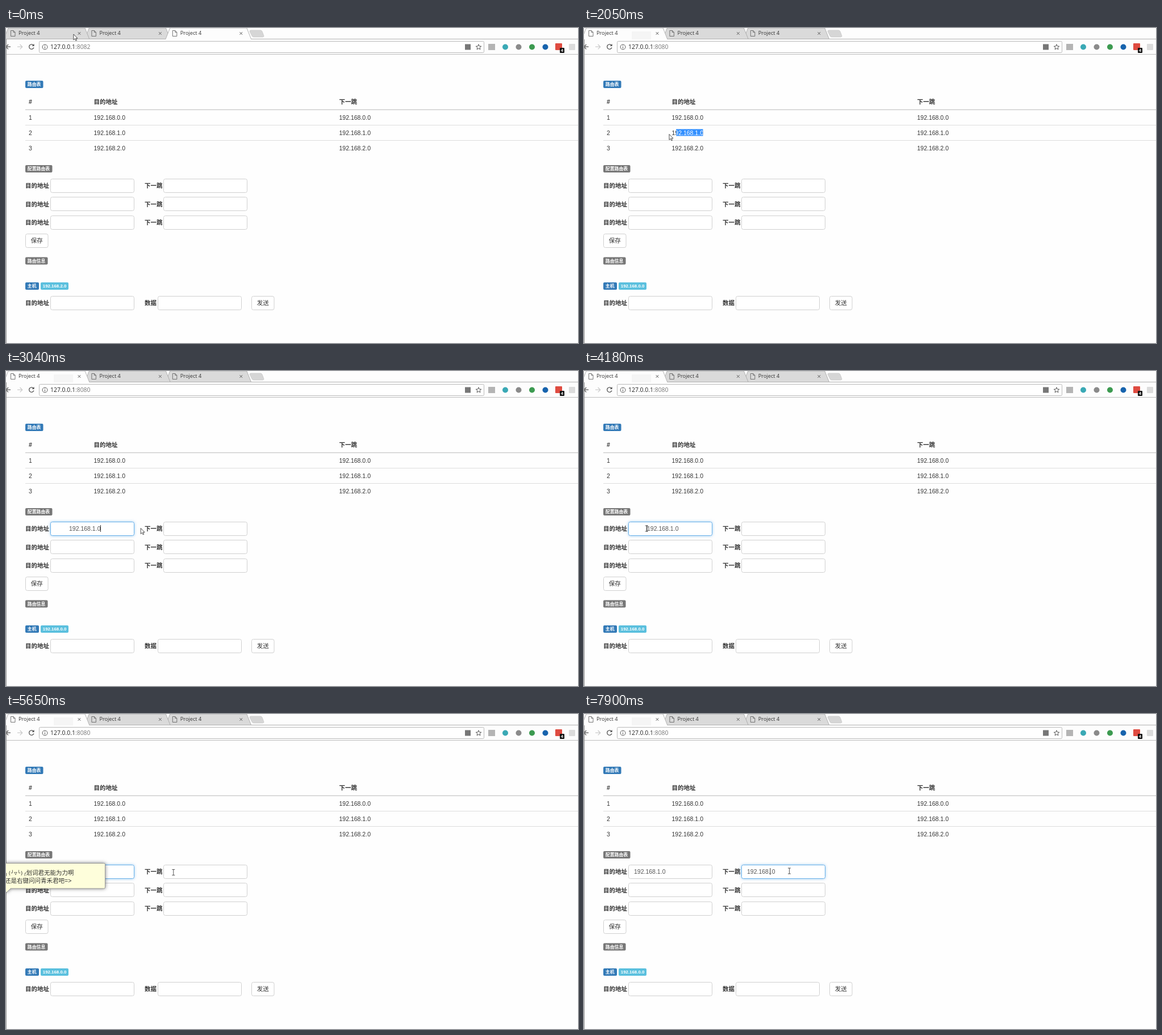
These frames come from a looping animation (1007x556 px, 8 s). An HTML page:

```html
<!DOCTYPE html>
<html lang="zh">
<head>
<meta charset="utf-8">
<style>
  html, body { margin: 0; width: 100%; height: 100%; overflow: hidden; background: #fefefe; }
  svg { display: block; width: 1007px; height: 556px; }
  text { font: 10.5px "Liberation Sans", "Noto Sans CJK SC", "Noto Sans CJK", sans-serif; fill: #333; white-space: pre; }
  .bold { font-weight: bold; }
  .badge { font-size: 7.875px; font-weight: bold; fill: #fff; }
  .tab { font: 9.2px "Open Sans", "Noto Sans", sans-serif; }
  .url { font: 10.4px "Open Sans", "Noto Sans", sans-serif; fill: #222; }
  .value { fill: #555; }
  .selected { fill: #fff; }
  .box { fill: #fff; stroke: #d0d0d0; }
  .focus { stroke: #66afe9; filter: drop-shadow(0 0 2.5px rgba(102, 175, 233, .65)); }
  .face { font: 9px "DejaVu Sans Mono", monospace; }
  .popup { filter: drop-shadow(0 0 3px rgba(0, 0, 0, .5)); }
</style>
</head>
<body>
<svg id="stage" viewBox="0 0 1007 556"></svg>
<script>
const LOOP = 8000;
const ADDRESS = '192.168.1.0';
const stage = document.getElementById('stage');

function set(node, attrs) {
  for (const key in attrs) node.setAttribute(key, attrs[key]);
  return node;
}
function el(tag, attrs, parent = stage) {
  return parent.appendChild(set(document.createElementNS('http://www.w3.org/2000/svg', tag), attrs));
}
function label(x, y, content, cls = '', parent = stage) {
  const node = el('text', { x, y, class: cls }, parent);
  node.textContent = content;
  return node;
}
const rect = (x, y, width, height, fill, more = {}, parent = stage) =>
  el('rect', { x, y, width, height, fill, ...more }, parent);
const path = (d, stroke, fill = 'none', width = 1, parent = stage) =>
  el('path', { d, stroke, fill, 'stroke-width': width }, parent);
const show = (node, visible) => node.setAttribute('visibility', visible ? 'visible' : 'hidden');
const clamp = (value, low = 0, high = 1) => Math.min(high, Math.max(low, value));
const during = (value, from, to) => value >= from && value < to;

// Browser chrome
rect(0, 0, 1007, 47, '#fdfdfd');
path('M431 4H448Q450 4 451 6L454 14Q454 16 452 16H436Q434 16 433 14L429 6Q429 4 431 4Z', '#c4c4c4', '#d6d6d6', .7);
const tabBar = el('g', {});
const tabLine = path('M0 19.5H1007', '#b0b0b0', 'none', 1, tabBar);
const tabs = [0, 1, 2].map(i => {
  const group = el('g', { transform: `translate(${142.4 * i} 0)` }, tabBar);
  const body = path('M-4 20L4 0H139L147 20', '#a4a4a4', '#dadada', .8, group);
  const ghost = rect(84, 6, 34, 14, '#f5f5f5', {}, group);
  path('M8.5 4.5H13L16 7.5V14.5H8.5ZM13 4.5V7.5H16', '#666', 'none', .9, group);
  label(22, 12.4, 'Project 4', 'tab', group);
  path('M126.7 7.2l4.6 4.6m0 -4.6l-4.6 4.6', '#555', 'none', 1, group);
  return { group, body, ghost };
});

function selectTab(active) {
  [2, 1, 0].forEach(i => tabBar.appendChild(tabs[i].group));
  tabBar.appendChild(tabLine);
  tabBar.appendChild(tabs[active].group);
  tabs.forEach((tab, i) => {
    tab.body.setAttribute('fill', i === active ? '#fdfdfd' : '#dadada');
    show(tab.ghost, active === 0 && i === 0);
  });
}

path('M8 33.2H0M4 29L0 33.2L4 37.4', '#555', 'none', 1.3);
path('M20 33.2H28.5M24.6 29L28.7 33.2L24.6 37.4', '#ccc', 'none', 1.3);
path('M48.4 30.5A4.3 4.3 0 1 0 49 34.6', '#555', 'none', 1.3);
path('M49.6 28V32H45.6Z', 'none', '#555');
rect(58.5, 23.5, 783, 20, '#fff', { rx: 2, stroke: '#b9b9b9' });
el('circle', { cx: 68.5, cy: 33.5, r: 4.4, fill: 'none', stroke: '#555' });
path('M68.5 30.6V31.8M68.5 32.8V36.2', '#555');
const url = label(78, 37.2, '127.0.0.1', 'url');
const port = el('tspan', { fill: '#777' }, url);
const starPoints = Array.from({ length: 10 }, (_, i) => {
  const angle = i * Math.PI / 5, radius = i % 2 ? 2.2 : 5;
  return [832 + radius * Math.sin(angle), 33.8 - radius * Math.cos(angle)];
});
path(`M${starPoints.join('L')}Z`, '#444', 'none', .9);
rect(808, 28.5, 10, 10, '#777');
rect(849, 28, 12, 11, '#b4b4b4');
['#3aa9b5', '#8a8a8a', '#3c9a50', '#1763ad'].forEach((fill, i) =>
  el('circle', { cx: 879 + 23.5 * i, cy: 33.5, r: 5, fill }));
rect(967, 27, 12, 12, '#df4b40', { rx: 1 });
rect(975, 35, 8, 9, '#111', { rx: 1 });
label(976.8, 42.3, '4', 'badge');
rect(991, 28, 11, 11, '#dcdcdc', { rx: 1 });
path('M0 46.5H1007', '#bdbdbd');
path('M.5 20V556', '#999');

// Page
function badge(x, y, width, color, content) {
  rect(x, y, width, 13, color, { rx: 2 });
  return label(x + 3.8, y + 9.3, content, 'badge');
}
const box = (x, y, width) => rect(x + .5, y + .5, width, 24, '#fff', { rx: 3, class: 'box' });
const input = (x, y) => box(x, y, 147);
function button(x, y, content) {
  box(x, y, 39.5);
  label(x + 9.7, y + 16, content);
}

badge(34, 93, 31.5, '#337ab7', '路由表');
label(40, 134, '#', 'bold');
label(154.5, 134, '目的地址', 'bold');
label(586.5, 134, '下一跳', 'bold');
path('M34 144.2H1007', '#d0d0d0', 'none', 1.4);
path('M34 171.5H1007M34 198.5H1007', '#ddd');
[0, 1, 2].forEach(i => {
  const y = 161.5 + 27 * i;
  label(40, y, i + 1);
  label(154.5, y, `192.168.${i}.0`);
  label(586.5, y, `192.168.${i}.0`);
});

badge(34, 242, 47.5, '#777', '配置路由表');
const fields = [0, 1, 2].flatMap(i => {
  const y = 266 + 32.5 * i;
  label(34, y + 16, '目的地址', 'bold');
  label(244, y + 16, '下一跳', 'bold');
  return [input(78, Math.floor(y)), input(277, Math.floor(y))];
});
button(34, 363, '保存');
badge(34, 404.5, 39.5, '#777', '路由信息');
badge(34, 449, 24, '#337ab7', '主机');
const host = badge(61, 449, 49, '#5bc0de', '');
label(34, 489, '目的地址', 'bold');
input(78, 473);
label(244, 489, '数据', 'bold');
input(267, 473);
button(432, 473, '发送');

const target = label(88, 282, '', 'value');
const nextHop = label(287, 282, '', 'value');
const caret = rect(0, 272, 1, 12, '#333');

// Highlighted text: a blue box and a white copy clipped to it
const clipBox = rect(0, 0, 0, 0, '#000', {}, el('clipPath', { id: 'selected' }));
const selectionBox = rect(0, 0, 0, 0, '#3390ff');
const selectionText = label(0, 0, ADDRESS, 'selected', el('g', { 'clip-path': 'url(#selected)' }));

// Dictionary bubble
const popup = el('g', { class: 'popup' });
const bubble = path('', '#999', '#fefedb', 1, popup);
label(7.5, 20, '╮(╯▽╰)╭', 'face', popup);
label(45, 20, '划词君无能为力啊', '', popup);
label(7.5, 34, '还是右键问问青禾君吧=>', '', popup);
const scrollbar = el('g', {}, popup);
rect(12.5, 45, 159, 10, '#c1c1c1', {}, scrollbar);
path('M9 47L5.5 50L9 53ZM175.5 47L179 50L175.5 53Z', 'none', '#999', 1, scrollbar);

const arrow = path('M0 0V10L2.4 7.8L4 11.4L5.6 10.6L4 7.2H7Z', '#222', '#fff', .8);
const beam = path('M-2.5 -5H2.5M0 -5V5M-2.5 5H2.5', '#444', 'none', .9);

// Stops of the hand on the mouse: time, x, y
const stops = [
  [0, 119, 11], [390, 86, 7], [630, 95, 25], [1020, 193, 172], [1290, 218, 181],
  [1600, 218, 181], [1900, 151, 190], [2200, 149, 185], [2560, 164.5, 268], [2920, 152, 277],
  [3160, 321, 278], [3640, 141, 276], [3940, 110.5, 278], [4180, 110.5, 278], [4420, 16, 279],
  [4720, 165, 280], [4960, 84, 278], [5230, 114, 277], [5500, 275, 279], [6160, 361.5, 281],
  [6310, 361.5, 277]
];
const drags = [
  { press: 1600, release: 2000, clear: 2800, left: 154.5, right: 209.5, textX: 154.5, baseline: 188.5 },
  { press: 4200, release: 4570, clear: 4570, left: 88, right: 111, textX: 111, baseline: 282 },
  { press: 4720, release: 5110, clear: 5920, left: 88, right: 143, textX: 88, baseline: 282 }
];
const popups = [
  { open: 2200, close: 2800, x: 89.5, y: 154.5, height: 56.5, tip: 92, scrolls: true },
  { open: 5110, close: 5900, x: -9.5, y: 263.5, height: 44.5, tip: 10.5, scrolls: false }
];

function pointerAt(t) {
  const next = stops.findIndex(stop => stop[0] > t);
  if (next < 0) return stops.at(-1).slice(1);
  const [t0, x0, y0] = stops[next - 1];
  const [t1, x1, y1] = stops[next];
  const k = (t - t0) / (t1 - t0);
  return [x0 + (x1 - x0) * k, y0 + (y1 - y0) * k];
}

function drawPointer(t) {
  const [x, y] = pointerAt(t);
  const inField = during(y, 265, 292) && (during(x, 78, 226) || during(x, 277, 425));
  const isBeam = inField || drags.some(drag => during(t, drag.press, drag.release));
  [arrow, beam].forEach(node => node.setAttribute('transform', `translate(${x} ${y})`));
  show(arrow, !isBeam);
  show(beam, isBeam);
}

// A drag to the left selects everything between the pointer and its right end
function drawSelection(t) {
  const drag = drags.find(({ press, clear }) => during(t, press, clear));
  [selectionBox, selectionText].forEach(node => show(node, drag));
  if (!drag) return;
  const { left, right, textX, baseline } = drag;
  const x = clamp(pointerAt(Math.min(t, drag.release - 150))[0], left, right);
  [clipBox, selectionBox].forEach(node => set(node, { x, y: baseline - 10, width: right - x, height: 12 }));
  set(selectionText, { x: textX, y: baseline });
}

function drawPopup(t) {
  const current = popups.find(({ open, close }) => during(t, open, close + 120));
  show(popup, current);
  show(scrollbar, current?.scrolls);
  if (!current) return;
  const { open, close, x, y, height: h, tip } = current;
  const opacity = Math.min(clamp(.2 + (t - open) / 350), clamp(1 - (t - close) / 120));
  set(popup, { transform: `translate(${x} ${y})`, opacity });
  bubble.setAttribute('d', `M2 0H182Q184 0 184 2V${h - 2}Q184 ${h} 182 ${h}` +
    `H${tip + 7}L${tip} ${h + 7}L${tip - 7} ${h}H2Q0 ${h} 0 ${h - 2}V2Q0 0 2 0Z`);
}

function drawCaret(field, index) {
  const width = index ? field.getSubStringLength(0, index) : 0;
  caret.setAttribute('x', Number(field.getAttribute('x')) + width - .5);
}

function drawFields(t) {
  fields[0].classList.toggle('focus', during(t, 2800, 5920));
  fields[1].classList.toggle('focus', t >= 5920);
  target.textContent = t < 3040 ? '' : ADDRESS;
  target.setAttribute('x', t < 4570 ? 111 : 88);
  nextHop.textContent = t < 6040 ? '' : t < 7900 ? ADDRESS : ADDRESS.replace('1.0', '.0');

  show(caret, during(t, 3040, 4300) || during(t, 6040, 6460) || t >= 6860);
  if (during(t, 3040, 4300)) drawCaret(target, t < 3940 ? ADDRESS.length : 0);
  if (t >= 6040) {
    // Three presses of the left key, one back to the right, then backspace
    const presses = clamp(Math.floor((t - 6860) / 120) + 1, 0, 3);
    drawCaret(nextHop, ADDRESS.length - presses + during(t, 7500, 7900));
  }
}

let activeTab;
function render(t) {
  const tab = t < 630 ? 2 : 0;
  if (tab !== activeTab) selectTab(activeTab = tab);
  port.textContent = `:808${tab}`;
  host.textContent = `192.168.${tab}.0`;
  drawFields(t);
  drawSelection(t);
  drawPopup(t);
  drawPointer(t);
}

const start = performance.now();
function tick() {
  render((performance.now() - start) % LOOP);
  requestAnimationFrame(tick);
}
tick();
</script>
</body>
</html>
```
